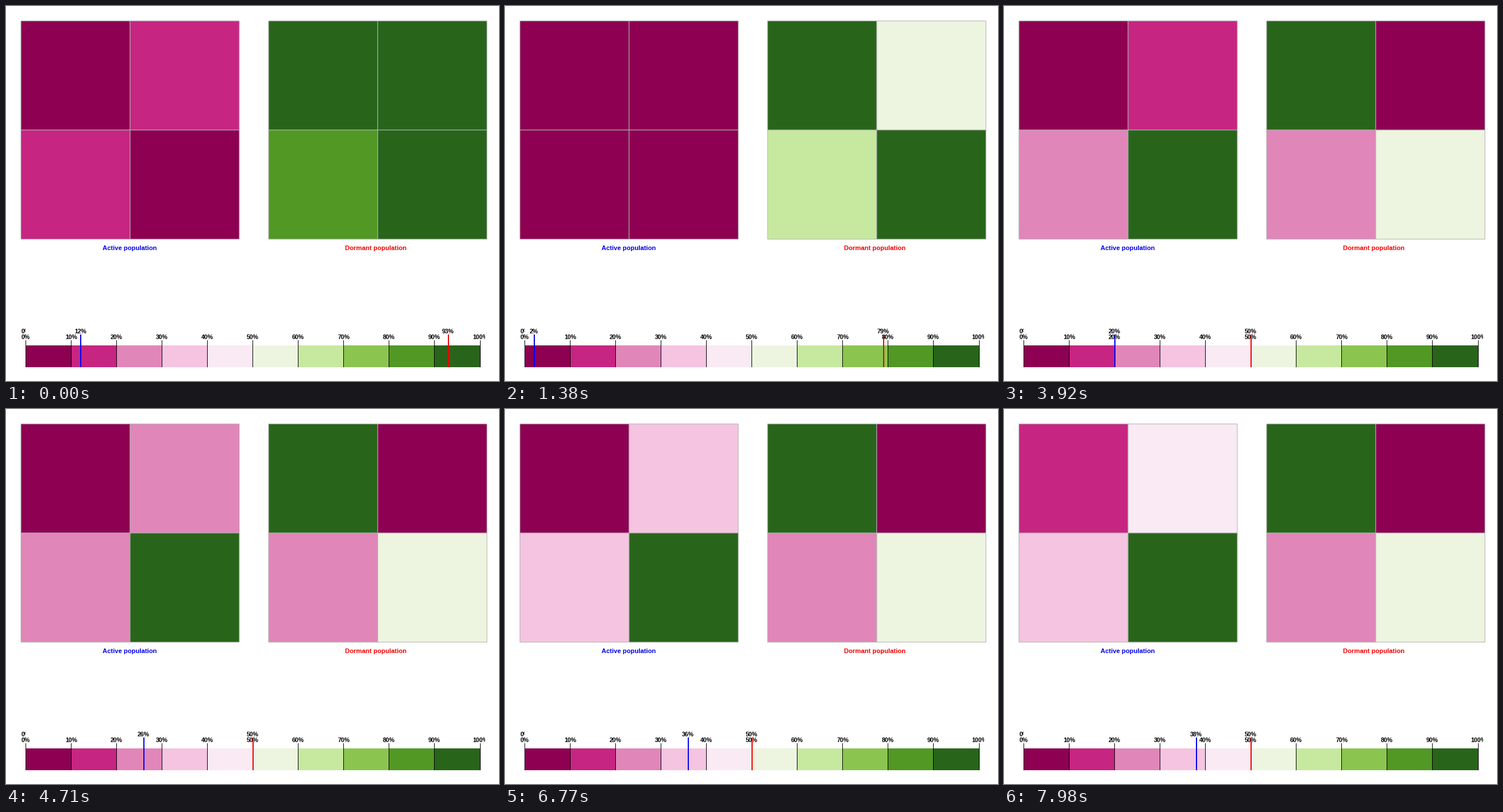
Write a matplotlib script that moves like this. It is 858x653 px and loops after 8000 ms.

```python
import math
import matplotlib.pyplot as plt
from matplotlib.animation import FuncAnimation
from matplotlib.patches import Rectangle

W, H, DPI = 858, 653, 64
STEP, FRAMES = 40, 200
SWITCH = 2580  # ms, the active population starts to recover

COLORS = ["#8d0052", "#c72582", "#e186b9", "#f5c4e0", "#f9eaf4",
          "#edf5e0", "#c7e99f", "#8bc550", "#529825", "#28651b"]
GRID = "#b0b0b0"

# Cells run top left, top right, bottom left, bottom right
ACTIVE = [(5, 20, 6700), (15, 62, 4800), (14, 40, 1600), (5, 97, 5)]
DORMANT = [(99, 0, 1), (98, 98, 1), (86, 59, 1), (97, 39, 3)]


def progress(t, start, end):
    return min(max((t - start) / (end - start), 0), 1)


def recover(t, limit, tau):
    return limit * (1 - math.exp((SWITCH - t) / tau))


def active_cell(t, start, limit, tau):
    return start * math.exp(-t / 1200) if t < SWITCH else recover(t, limit, tau)


def dormant_cell(t, start, drop, power):
    return start - drop * progress(t, 700, 2350) ** power


def active_mean(t):
    if t < SWITCH:
        return round(1 + 11 * math.exp(-t / 560))
    return round(1 + recover(t, 40, 2080))


def dormant_mean(t):
    return round(93 - 43 * progress(t, 0, 2560) ** 1.77)


def scale_x(percent):
    return math.floor(34.2 + 7.908 * percent)


fig = plt.figure(figsize=(W / DPI, H / DPI), dpi=DPI, facecolor="white")
ax = fig.add_axes([0, 0, 1, 1])
ax.set_xlim(0, W)
ax.set_ylim(H, 0)
ax.axis("off")


def rect(x, y, w, h, color, z=1):
    patch = Rectangle((x, y), w, h, facecolor=color, linewidth=0,
                      antialiased=False, zorder=z)
    return ax.add_patch(patch)


def cell(x, y):
    patch = Rectangle((x, y), 190, 190, edgecolor=GRID, snap=False,
                      linewidth=72 / DPI)
    return ax.add_patch(patch)


def label(x, y, text, px=10.5, color="black", z=5):
    return ax.text(x, y, text, fontsize=px * 72 / DPI, color=color,
                   family="Liberation Sans", weight="bold",
                   ha="center", va="baseline", zorder=z)


def panel(x, title, title_x, color):
    label(title_x, 425, title, 11.25, color)
    return [cell(x + 190 * i, 26 + 190 * j) for j in range(2) for i in range(2)]


def marker(color):
    return rect(0, 572, 2, 57, color, 6), label(0, 570.5, "")


def move(mark, percent):
    bar, text = mark
    x = scale_x(percent)
    bar.set_x(x)
    text.set_x(x + 0.5)
    text.set_text(f"{percent}%")


def paint(cells, rule, params, t):
    for patch, args in zip(cells, params):
        level = int(rule(t, *args) / 10)
        patch.set_facecolor(COLORS[min(max(level, 0), 9)])


active_cells = panel(26, "Active population", 215.5, "#0000e6")
dormant_cells = panel(457, "Dormant population", 643.5, "#f50000")

for k, color in enumerate(COLORS):
    x = scale_x(10 * k)
    rect(x, 591, scale_x(10 * k + 10) - x, 38, color)
for k in range(11):
    x = scale_x(10 * k)
    rect(x, 582, 1, 47, "black", 3)
    label(x + 0.5, 580, f"{10 * k}%")
rect(834, 560, 20, 21, "white", 6)

# A zero label whose right half is cut off
label(34, 570.5, "0%", z=3)
rect(34, 562, 10, 10, "white", 4)

blue, red = marker("#0000f0"), marker("#f00000")


def draw(frame):
    t = frame * STEP
    paint(active_cells, active_cell, ACTIVE, t)
    paint(dormant_cells, dormant_cell, DORMANT, t)
    move(blue, active_mean(t))
    move(red, dormant_mean(t))
    return [*active_cells, *dormant_cells, *blue, *red]


anim = FuncAnimation(fig, draw, frames=FRAMES, interval=STEP,
                     repeat=True, repeat_delay=0, blit=False)
plt.show()
```
